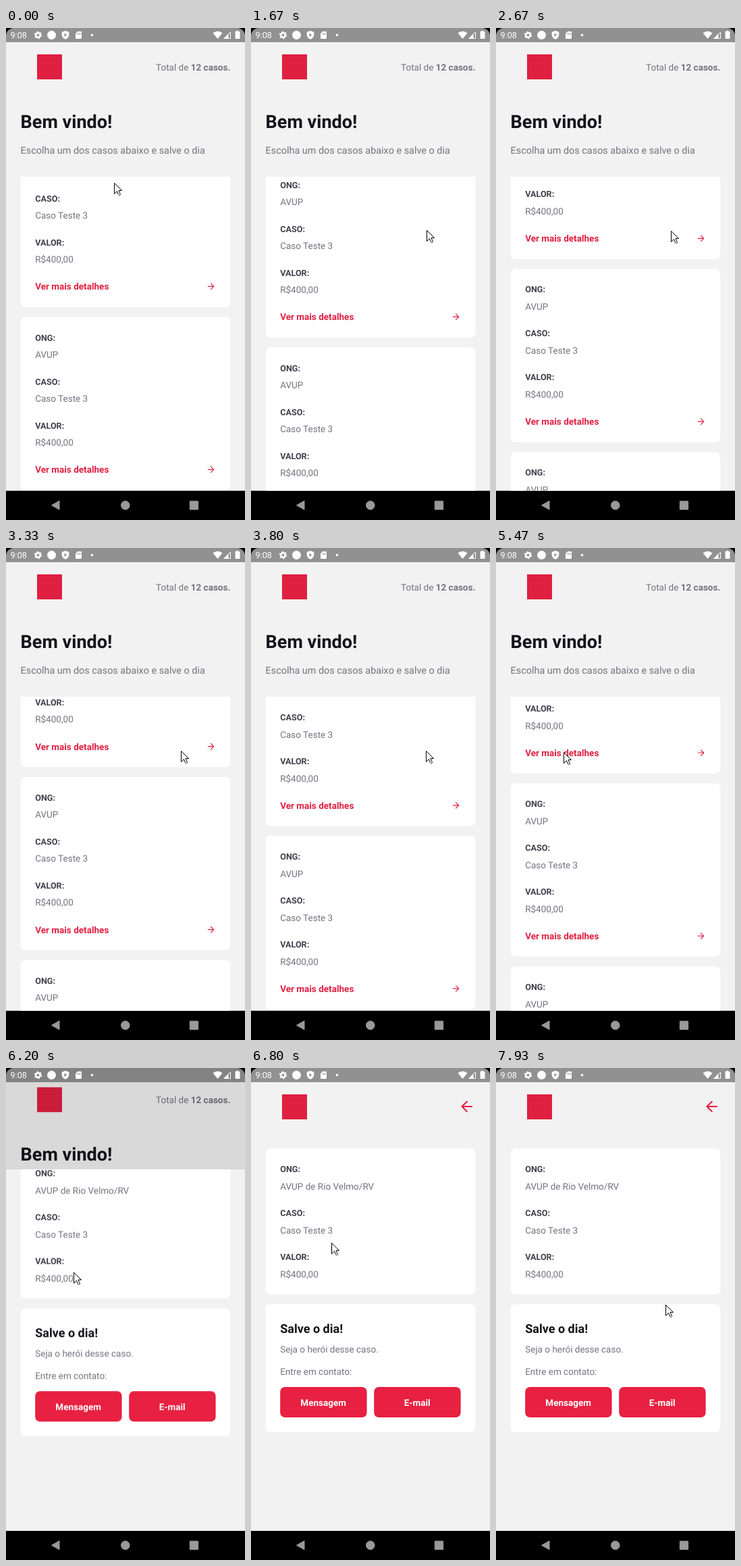
These frames come from a looping animation (354 by 728 pixels, 8000 ms). An HTML page:

```html
<!DOCTYPE html>
<html lang="pt">
<head>
<meta charset="utf-8">
<title>Casos</title>
<style>
html, body { margin: 0; width: 100%; height: 100%; overflow: hidden; background: #000; }
svg { display: block; width: 354px; height: 728px; font: 13.52px Roboto, sans-serif; text-rendering: geometricPrecision; }

.page { fill: #f2f2f2; }
.box { fill: #fff; }
.label { font-size: 12.62px; font-weight: 700; fill: #41414d; }
.value { fill: #737380; }
.more { font-weight: 700; fill: #e02041; }
.title { font-weight: 700; fill: #13131a; }
.arrow { fill: none; stroke: #e02041; stroke-width: 2; stroke-linecap: round; stroke-linejoin: round; }
.button { fill: #e82041; }
.action { font-weight: 700; fill: #fff; text-anchor: middle; }

.scroll, .cursor, .press, .home, .shade, .sheet, .sheet-content {
  animation: 8s linear infinite;
}
.scroll { animation-name: scroll; }
.cursor { animation-name: cursor; }
.press { animation-name: press; }
.home { animation-name: recede; }
.shade { animation-name: shade; }
.sheet { animation-name: reveal; }
.sheet-content { animation-name: counter; }

@keyframes scroll {
  0%, 16.6667% { transform: translateY(0); }
  20.8333%, 21.6667% { transform: translateY(-226px); animation-timing-function: ease-out; }
  25%, 29.1667% { transform: translateY(-262px); animation-timing-function: ease-in; }
  33.3333% { transform: translateY(-342px); }
  41.6667% { transform: translateY(-630.7px); animation-timing-function: cubic-bezier(.25, .44, .5, 1); }
  55%, 100% { transform: translateY(-892.4px); }
}
@keyframes cursor {
  0% { transform: translate(160px, 229px); }
  2.5% { transform: translate(157px, 300px); }
  5% { transform: translate(195px, 377px); }
  7.5% { transform: translate(265px, 345px); }
  10%, 27.4% { transform: translate(260px, 299px); }
  27.45%, 60% { transform: translate(259px, 300px); }
  62.5% { transform: translate(215px, 305px); }
  66% { transform: translate(120px, 292px); }
  68.3333%, 83.3333% { transform: translate(100px, 302px); }
  86.6667% { transform: translate(138px, 215px); }
  88.3333% { transform: translate(120px, 186px); }
  91.6667%, 93.3333% { transform: translate(51px, 267px); animation-timing-function: ease-in-out; }
  99.1%, 100% { transform: translate(251px, 350px); }
}
@keyframes press {
  0%, 70.8% { opacity: 1; }
  70.81%, 100% { opacity: .2; }
}
@keyframes shade {
  0%, 76.04% { opacity: 0; }
  76.1%, 100% { opacity: .1; }
}
@keyframes recede {
  0%, 76.04% { transform: translateY(0); animation-timing-function: cubic-bezier(.20833, .82, .25, 1); }
  81.35%, 100% { transform: translateY(-13.7px); }
}
@keyframes reveal {
  0%, 76.04% { transform: translateY(685px); animation-timing-function: cubic-bezier(.20833, .82, .25, 1); }
  81.35%, 100% { transform: translateY(0); }
}
@keyframes counter {
  0%, 76.04% { transform: translateY(-656.9px); animation-timing-function: cubic-bezier(.20833, .82, .25, 1); }
  81.35%, 100% { transform: translateY(0); }
}
</style>
</head>
<body>
<svg viewBox="0 0 354 728">
  <defs>
    <clipPath id="screen"><path d="M0 684.7V12a12 12 0 0 1 12-12h330a12 12 0 0 1 12 12v672.700z"/></clipPath>
    <clipPath id="sheet-area"><path d="M0 0h354v685H0z"/></clipPath>
    <clipPath id="list-area"><path d="M0 220h354v465H0z"/></clipPath>

    <rect id="logo" x="46" y="39" width="37" height="37" fill="#e02041"/>

    <!-- y = 0 is the middle of the first label -->
    <g id="case">
      <rect class="box" x="21.6" y="-30.4" width="310.8" height="256.4" rx="7.2"/>
      <g class="label">
        <text x="43.2" y="4.5">ONG:</text>
        <text x="43.2" y="69.5">CASO:</text>
        <text x="43.2" y="134.5">VALOR:</text>
      </g>
      <g class="value">
        <text x="43.2" y="30.2">AVUP</text>
        <text x="43.2" y="95.2">Caso Teste 3</text>
        <text x="43.2" y="160.2">R$400,00</text>
      </g>
    </g>
    <g id="link">
      <text class="more" x="43.2" y="200.4">Ver mais detalhes</text>
      <path class="arrow" transform="translate(303.5 195.4) scale(.6)" d="M-7 0H7M0-7 7 0 0 7"/>
    </g>
  </defs>

  <rect width="354" height="728"/>

  <g clip-path="url(#screen)">
    <rect class="page" width="354" height="685"/>
    <g class="home">
      <use href="#logo"/>
      <text class="value" x="332.4" y="62.8" text-anchor="end">Total de <tspan font-weight="700">12 casos.</tspan></text>
      <text class="title" x="21.6" y="147.5" font-size="27.04">Bem vindo!</text>
      <text class="value" x="21.6" y="186" font-size="14.42">Escolha um dos casos abaixo e salve o dia</text>
      <g clip-path="url(#list-area)"><g class="scroll" id="list"></g></g>
    </g>
    <rect class="shade" width="354" height="685"/>

    <g class="sheet" clip-path="url(#sheet-area)">
      <g class="sheet-content">
        <rect class="page" width="354" height="685"/>
        <use href="#logo"/>
        <path class="arrow" transform="translate(319.8 57) scale(1.05)" d="M7 0H-7M0-7-7 0 0 7"/>

        <rect class="box" x="21.6" y="119" width="310.8" height="216" rx="7.2"/>
        <g class="label">
          <text x="43.2" y="154.3">ONG:</text>
          <text x="43.2" y="219.3">CASO:</text>
          <text x="43.2" y="284.3">VALOR:</text>
        </g>
        <g class="value">
          <text x="43.2" y="180">AVUP de Rio Velmo/RV</text>
          <text x="43.2" y="245">Caso Teste 3</text>
          <text x="43.2" y="310">R$400,00</text>
        </g>

        <rect class="box" x="21.6" y="349.5" width="310.8" height="189.5" rx="7.2"/>
        <text class="title" x="43.2" y="392.3" font-size="18.03">Salve o dia!</text>
        <g class="value">
          <text x="43.2" y="420.5">Seja o herói desse caso.</text>
          <text x="43.2" y="454">Entre em contato:</text>
        </g>
        <rect class="button" x="43.2" y="472" width="128.4" height="45" rx="7.2"/>
        <rect class="button" x="182.2" y="472" width="128.4" height="45" rx="7.2"/>
        <text class="action" x="107.2" y="500">Mensagem</text>
        <text class="action" x="246.2" y="500">E-mail</text>
      </g>
    </g>

    <!-- status bar -->
    <rect width="354" height="21" opacity=".4"/>
    <g fill="#fff">
      <text x="6.5" y="15" font-size="12.6">9:08</text>
      <g fill="none" stroke="#fff">
        <circle cx="47.5" cy="10.5" r="3.2" stroke-width="2.6"/>
        <circle cx="47.5" cy="10.5" r="4.9" stroke-width="1.6" stroke-dasharray="2.6 2.53"/>
      </g>
      <circle cx="67.5" cy="10.5" r="6.5"/>
      <path fill-rule="evenodd" d="M88 4l5.3 2v4c0 3-2.2 5.6-5.3 6.8-3.1-1.2-5.3-3.8-5.3-6.8V6zM86.4 7.8v5l4-2.5z"/>
      <path fill-rule="evenodd" d="M106.3 5H111a1 1 0 0 1 1 1v9a1 1 0 0 1-1 1h-7a1 1 0 0 1-1-1V8.3zM105.5 7.5V10h1V7.5zm2 0V10h1V7.5zm2 0V10h1V7.5z"/>
      <circle cx="127.5" cy="10.5" r="1.8"/>
      <path d="M306.5 7.5q7-5.500 14 0L313.5 16z"/>
      <path d="M329.500 8.500V16H322z"/>
      <path d="M323 15.500h9.500V6z" fill="none" stroke="#fff"/>
      <path d="M341 5V4h3v1h1.5q1 0 1 1v9q0 1-1 1h-5q-1 0-1-1V6q0-1 1-1z"/>
    </g>
  </g>

  <!-- navigation bar -->
  <g fill="#999" stroke="#999" stroke-linejoin="round">
    <path d="M67.5 706.2l11.500-6.500v13z"/>
    <circle cx="176.8" cy="706.2" r="6.300"/>
    <rect x="272.300" y="700.100" width="12.300" height="12.300"/>
  </g>

  <path class="cursor" fill="#fff" stroke="#000" stroke-linejoin="round" d="M.5 .5V16.500L4.500 12.500 6.500 17.500 7.500 18.500H8.500L9.500 17.500 7 11.500H11.500z"/>
</svg>
<script>
const FPS = 15, LOOP = 8000, PITCH = 271, FIRST = 187, PRESSED = 3;

document.getElementById('list').innerHTML = Array.from({ length: 6 }, (_, i) => {
  const y = FIRST + i * PITCH;
  return `<use href="#case" y="${y}"/><use href="#link" y="${y}"${i === PRESSED ? ' class="press"' : ''}/>`;
}).join('');

// Drive every keyframe animation from one clock that advances in 1/15 s steps.
const animations = document.getAnimations();
animations.forEach(a => a.pause());
const start = performance.now();

function tick() {
  const elapsed = (performance.now() - start) % LOOP;
  const stepped = Math.floor((elapsed + 4) * FPS / 1000) * 1000 / FPS % LOOP;
  animations.forEach(a => { a.currentTime = stepped + .01; });
  requestAnimationFrame(tick);
}
tick();
</script>
</body>
</html>
```
